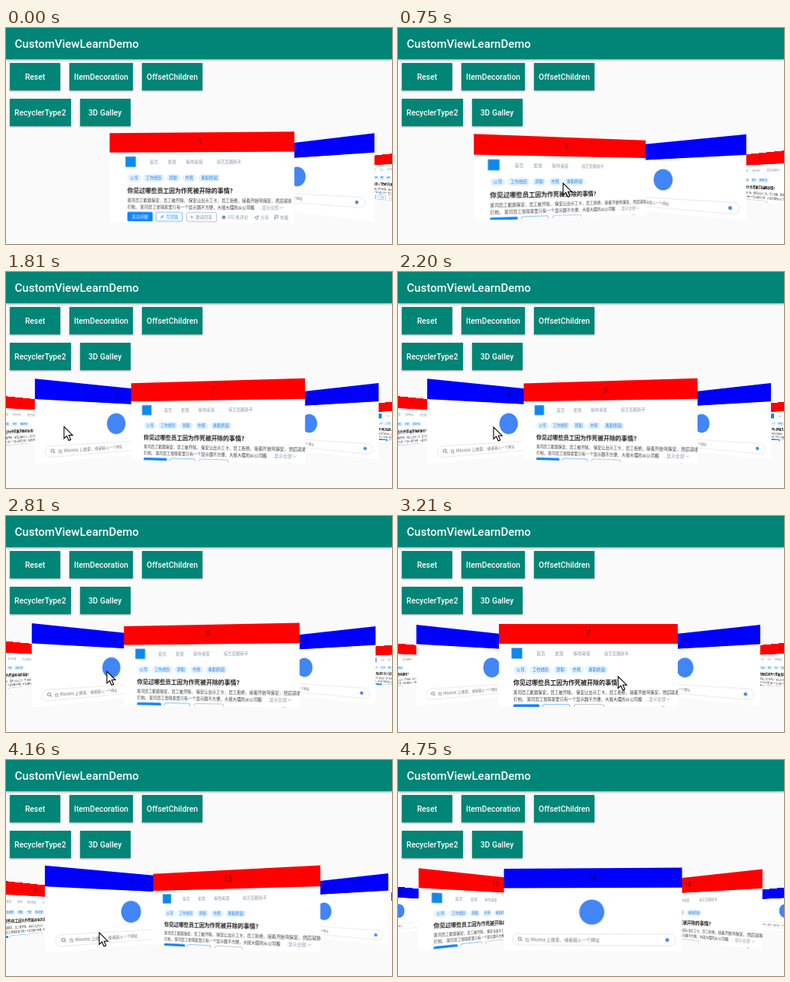
These frames come from a looping animation (505 px wide and 284 px high, 5.31 s). An HTML page:

```html
<!DOCTYPE html>
<html lang="en">
<head>
<meta charset="utf-8">
<title>CustomViewLearnDemo</title>
<style>
html, body { margin: 0; width: 100%; height: 100%; overflow: hidden; background: #fafafa; }
#stage { position: relative; width: 505px; height: 284px; overflow: hidden; font-family: Roboto, sans-serif; }
header { position: absolute; left: 0; top: 0; width: 505px; height: 40.5px; background: #008577;
  box-shadow: 0 1px 3px rgba(0,0,0,.4); color: #fff; font: 500 15px/42px Roboto, sans-serif; text-indent: 11.5px; }
.row { position: absolute; left: 5px; display: flex; gap: 12px; }
.row div { box-sizing: border-box; min-width: 66px; height: 36px; padding: 0 6px; background: #008577; color: #fff;
  text-align: center; font: 500 10.3px/37px Roboto, sans-serif; box-shadow: 0 1px 2px rgba(0,0,0,.4); white-space: nowrap; }
#gallery { position: absolute; inset: 0; clip-path: inset(138px 0 32px 0); }
#gallery.tall { clip-path: none; }
.card { position: absolute; left: 0; top: 141.5px; width: 234px; height: 109px; background: #fff; overflow: hidden; }
.tall .card { top: 136.5px; width: 243px; height: 119px; }
.band { position: absolute; left: 0; top: 0; width: 100%; height: 26px; color: rgba(0,0,0,.58);
  font: 11px/26px Roboto, sans-serif; text-align: center; }
.card svg { position: absolute; left: 0; top: 0; }
.tall .card svg { left: 4.5px; }
svg text { font-family: "Noto Sans CJK SC", "Noto Sans CJK", sans-serif; }
#cursor { position: absolute; left: 0; top: 0; z-index: 99; }
</style>
</head>
<body>
<div id="stage">
  <header>CustomViewLearnDemo</header>
  <div class="row" style="top:46px"><div>Reset</div><div>ItemDecoration</div><div>OffsetChildren</div></div>
  <div class="row" style="top:93px"><div>RecyclerType2</div><div>3D Galley</div></div>
  <div id="gallery"></div>
  <svg id="cursor" width="16" height="22"><path d="M1 1V16.5L4.6 13.2L7.2 19L9.8 17.9L7.3 12.2H12.2Z" fill="#fff" stroke="#000" stroke-width="1.1"/></svg>
</div>
<script>
const LOOP = 5310, STEP = 57, MID = 249, GAP = 126, DEPTH = 234, COUNT = 18;
const gallery = document.getElementById('gallery');
const cursor = document.getElementById('cursor');

// Card artwork
const text = (x, y, size, fill, str, extra = '') =>
  `<text x="${x}" y="${y}" font-size="${size}" fill="${fill}" ${extra}>${str}</text>`;
const box = (x, y, w, h, r, fill, stroke = 'none') =>
  `<rect x="${x}" y="${y}" width="${w}" height="${h}" rx="${r}" fill="${fill}" stroke="${stroke}" stroke-width=".6"/>`;
const path = (d, color, width) => `<path d="${d}" fill="none" stroke="${color}" stroke-width="${width}"/>`;
const dot = (x, y, r, fill) => `<circle cx="${x}" cy="${y}" r="${r}" fill="${fill}"/>`;
const svg = body => `<svg width="234" height="120">${body}</svg>`;
const centered = 'text-anchor="middle"';
const grey = '#8590a6', blue = '#0f84ff';

function pills(words, x) {
  return words.map(word => {
    const w = 5 * word.length + 8.5;
    const pill = box(x, 55, w, 10.5, 5.2, '#e5f2ff') + text(x + w / 2, 62.3, 5.4, '#0f78e0', word, centered);
    x += w + 2.7;
    return pill;
  }).join('');
}

const question = svg(
  box(16.5, 31.5, 14, 14, 0, '#0f88eb') +
  ['首页', '发现', '等你来答'].map((word, i) => text(49 + 24 * i, 41, 5.7, grey, word)).join('') +
  text(138, 41, 5.3, grey, '综艺恋圈新手') +
  pills(['公司', '工作经历', '辞职', '作死', '离职原因'], 19) +
  text(19, 80.3, 8, '#1a1a1a', '你见过哪些员工因为作死被开除的事情?', 'font-weight="700"') +
  text(19, 92, 5.4, '#333', '某司员工能篇保安，员工被开除。 保安让出示工卡，员工拒绝，接着开始骂保安，然后就收') +
  text(19, 101, 5.4, '#333', '打他。 某司员工觉得家里只有一个显示器不方便，大摇大摆的从公司搬') +
  box(192, 95, 36, 8, 0, '#fff') + text(192, 101, 5.4, grey, '...显示全部') +
  path('M220 98l1.8 1.8l1.8-1.8', grey, .7) +
  box(19, 105.5, 34, 12.5, 1.5, blue) + text(36, 113.9, 5.5, '#fff', '关注问题', centered) +
  box(57.5, 105.8, 35, 12, 1.5, '#fff', blue) + path('M64 113.5l3.5-3.5', blue, 1.2) + text(71, 113.9, 5.5, blue, '写回答') +
  box(98.5, 105.8, 39, 12, 1.5, '#fff', grey) + path('M103 112h4M105 110v4', grey, .8) + text(110, 113.9, 5.5, grey, '邀请回答') +
  dot(147, 112, 2.4, grey) + text(152, 113.9, 5.5, grey, '102 条评论') +
  path('M187 112l5-2.5l-1.5 5z', grey, 1) + text(194.5, 113.9, 5.5, grey, '分享') +
  path('M213 115v-6h4v3h-4', grey, 1) + text(219.5, 113.9, 5.5, grey, '举报')
);
const search = svg(
  dot(117, 58, 16.5, '#4285f4') +
  box(12, 87, 214, 15, 7.5, '#fff', '#d3d6db') +
  dot(21.3, 93.6, 2.4, '#666') + dot(21.3, 93.6, 1.6, '#fff') + path('M22.8 95.1l2 2', '#666', .9) +
  text(28.5, 97, 5.9, '#757575', '在 Mivona 上搜索，或者输入一个网址') +
  dot(215, 94.5, 2.4, '#4285f4')
);

const cards = Array.from({ length: COUNT }, (_, i) => {
  const el = document.createElement('div');
  const even = i % 2;
  el.className = 'card';
  el.innerHTML = (even ? search : question) +
    `<div class="band" style="background:${even ? '#00f' : '#f00'}">${i + 1}</div>`;
  return gallery.appendChild(el);
});

// Key poses: time, scroll position in cards, pointer x and y
const keys = [
  [430, .957, 262, 284],
  [750, 1.226, 215, 203],
  [1480, 4.51, 36, 202],
  [2200, 8.825, 124, 203],
  [2440, 8.96, 124, 203],
  [2750, 8.96, 124, 203],
  [3210, 7, 287, 210],
  [3330, 6.96, 287, 210],
  [3520, 6.96, 287, 210],
  [4160, 12.675, 121, 226],
  [4750, 13.964, 150, 330]
];
const last = keys.length - 1;

// Monotone cubic slope at key j
function tangent(j, col) {
  if (j === 0 || j === last) return 0;
  const slope = i => (keys[i + 1][col] - keys[i][col]) / (keys[i + 1][0] - keys[i][0]);
  const a = slope(j - 1), b = slope(j);
  return a * b <= 0 ? 0 : 2 * a * b / (a + b);
}

// Pose at time t; each span moves in equal steps of about STEP ms
function pose(t) {
  if (t <= keys[0][0]) return keys[0];
  if (t >= keys[last][0]) return keys[last];
  const k = keys.findIndex(key => key[0] > t) - 1;
  const a = keys[k], b = keys[k + 1], h = b[0] - a[0];
  const n = Math.round(h / STEP);
  const p = Math.floor((t - a[0]) / h * n + .05) / n, q = 1 - p;
  return a.map((v, col) =>
    v * (1 + 2 * p) * q * q + tangent(k, col) * h * p * q * q +
    b[col] * p * p * (3 - 2 * p) - tangent(k + 1, col) * h * p * p * q);
}

function draw(t) {
  const tall = t < keys[0][0];
  const half = tall ? 121.5 : 117;
  const [, scroll, x, y] = pose(t);
  gallery.className = tall ? 'tall' : '';
  cards.forEach((el, i) => {
    const off = GAP * (i + 1 - scroll), dist = Math.abs(off);
    const angle = -38 * Math.tanh(off / 112);
    const back = DEPTH * (.0009 * dist + 1e-5 * dist * dist);
    el.style.display = dist < 340 ? '' : 'none';
    el.style.zIndex = 1000 - Math.round(Math.abs(off - 4));
    el.style.transform = `translateX(${MID + off - half}px) perspective(${DEPTH}px) translateZ(${-back}px) rotateY(${angle}deg)`;
  });
  cursor.style.display = tall || y > 284 ? 'none' : '';
  cursor.style.transform = `translate(${x}px, ${y}px)`;
}

const start = performance.now();
function loop() {
  draw((performance.now() - start) % LOOP);
  requestAnimationFrame(loop);
}
loop();
</script>
</body>
</html>
```
